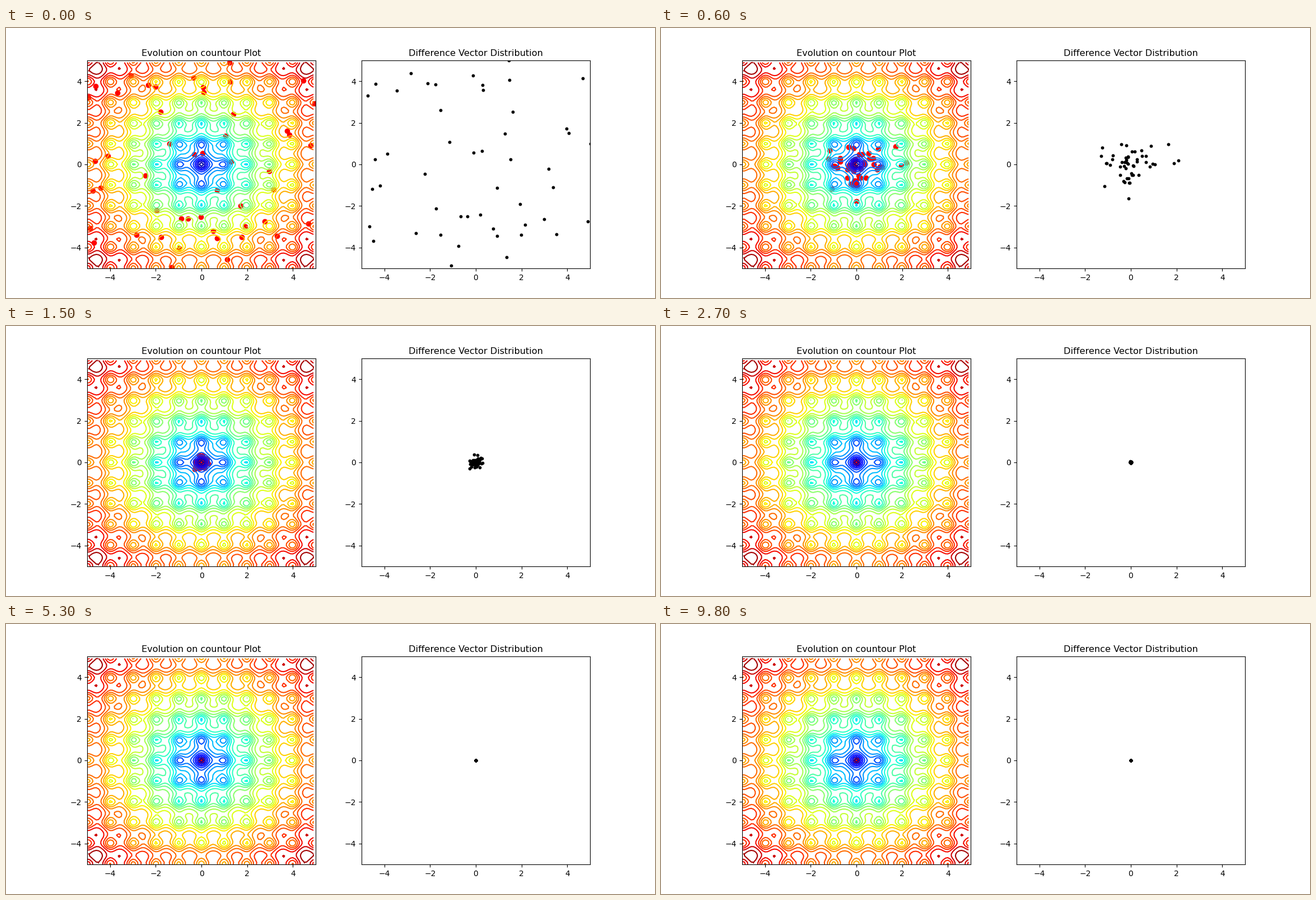
A matplotlib script for the animation above (10000 ms loop, 1159x483 px).

```python
import numpy as np
import matplotlib.pyplot as plt
from matplotlib.animation import FuncAnimation

WIDTH, HEIGHT, DPI = 1159, 483, 100
FRAMES, INTERVAL = 100, 100
LIMIT = 5         # half width of the search space
COUNT = 50        # population size
SPREAD = 3.2      # spread of the first trial points
DECAY = 0.18      # shrink rate of the spread per generation
SETTLED = 46      # last generation with visible change

rng = np.random.default_rng(7)


def ackley(x, y):
    bowl = -20 * np.exp(-0.2 * np.sqrt(0.5 * (x ** 2 + y ** 2)))
    ripple = -np.exp(0.5 * (np.cos(2 * np.pi * x) + np.cos(2 * np.pi * y)))
    return bowl + ripple + np.e + 20


def evolve():
    """Population per generation: a better trial point replaces its member."""
    population = rng.uniform(-LIMIT, LIMIT, (COUNT, 2))
    history = [population]
    for k in range(1, SETTLED + 1):
        spread = SPREAD * np.exp(-DECAY * k)
        trial = rng.normal(0, spread, (COUNT, 2)).clip(-LIMIT, LIMIT)
        better = ackley(*trial.T) < ackley(*population.T)
        population = np.where(better[:, None], trial, population)
        history.append(population)
    return history


history = evolve()

fig, (left, right) = plt.subplots(
    1, 2, figsize=(WIDTH / DPI, HEIGHT / DPI), dpi=DPI)

axis = np.arange(-LIMIT, LIMIT, 0.1)
gx, gy = np.meshgrid(axis, axis)
left.contour(gx, gy, ackley(gx, gy), levels=30, cmap="jet")

titles = "Evolution on countour Plot", "Difference Vector Distribution"
for ax, title in zip((left, right), titles):
    ax.set_title(title, fontsize=11.6)
    ax.set_xlim(-LIMIT, LIMIT)
    ax.set_ylim(-LIMIT, LIMIT)

members = left.scatter(*history[0].T, c="red", zorder=1)
offsets = right.scatter(*history[0].T, c="black", s=10)


def draw(frame):
    population = history[min(frame, SETTLED)]
    members.set_offsets(population)
    offsets.set_offsets(population - population.mean(axis=0))
    return members, offsets


anim = FuncAnimation(fig, draw, frames=FRAMES, interval=INTERVAL,
                     repeat=True, repeat_delay=0)
plt.show()
```
